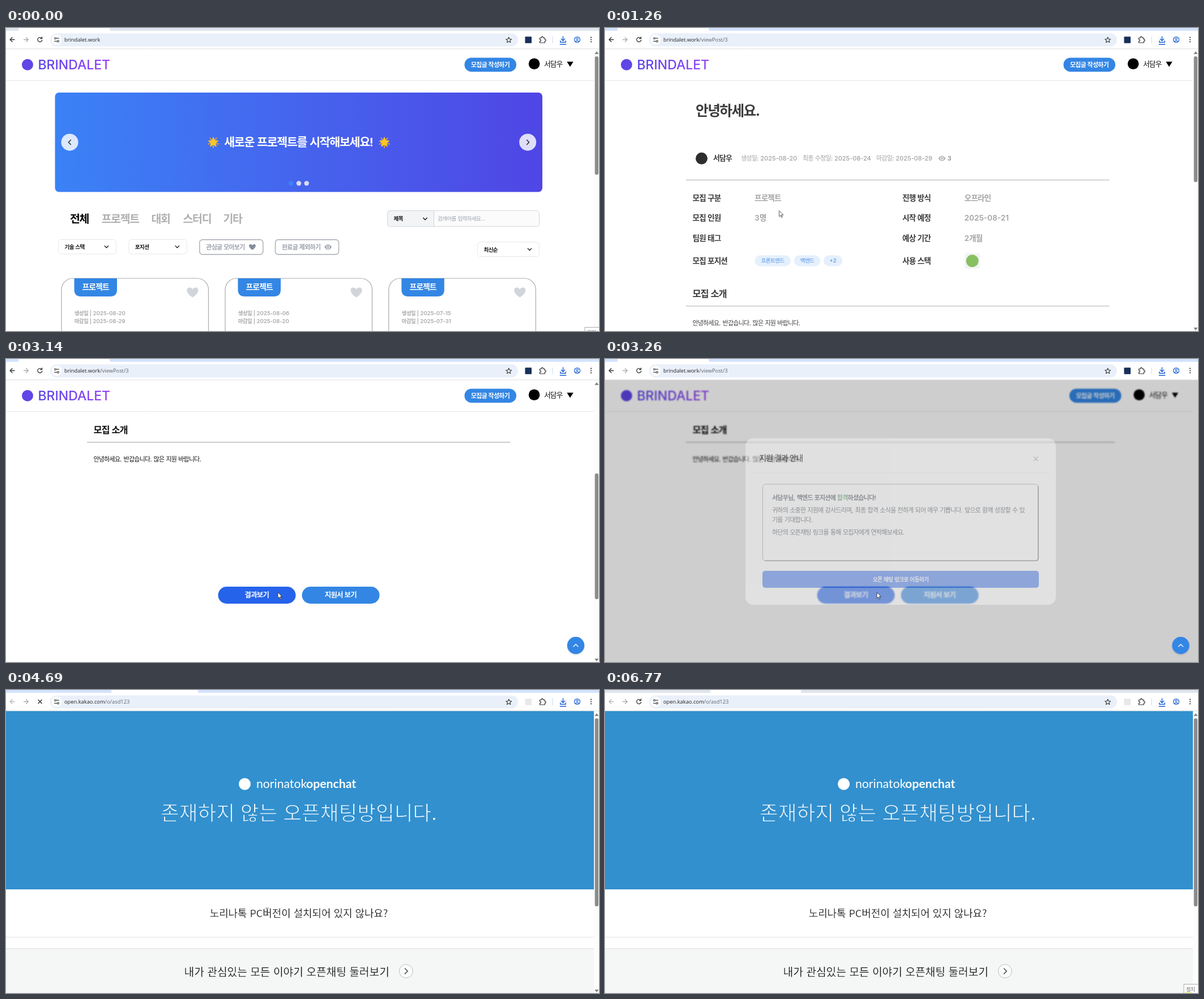
Animation of 1047 by 535 pixels, one loop 6810 ms. Source, as an HTML page:

```html
<!DOCTYPE html>
<html lang="ko">
<head>
<meta charset="utf-8">
<title>Project board demo</title>
<style>
html, body { margin: 0; width: 100%; height: 100%; overflow: hidden; background: #fff; }
svg { display: block; width: 1047px; height: 535px; }
text { font-family: Inter, "Noto Sans CJK KR", sans-serif; letter-spacing: -.064em; word-spacing: .065em; }
.l { letter-spacing: 0; }
.url { font-family: "Open Sans", "Noto Sans", sans-serif; letter-spacing: 0; }
.wide { font-family: "Noto Sans CJK KR", sans-serif; letter-spacing: 0; word-spacing: 0; }
.brand { font-family: Lato, sans-serif; letter-spacing: 0; }
.line { fill: none; stroke-linecap: round; stroke-linejoin: round; }

svg * { animation-duration: 6810ms; animation-iteration-count: infinite; animation-timing-function: linear; }
.home { animation-name: home; }
.post { animation-name: post; }
.mid { animation-name: mid; }
.site { animation-name: site; }
.chat { animation-name: chat; }
.loaded { animation-name: loaded; }
.loading { animation-name: loading; }
.ready { animation-name: ready; }
.home, .mid, .site, .chat, .loaded, .loading, .ready, .bar, .top { animation-timing-function: step-end; }
@keyframes home { 0% { opacity: 1 } 16.15%, 100% { opacity: 0 } }
@keyframes post { 0%, 16.14% { opacity: 0 } 16.15% { opacity: .3 } 18.5% { opacity: .82 } 20.26%, 100% { opacity: 1 } }
@keyframes mid { 0% { opacity: 0 } 16.15% { opacity: 1 } 66.96%, 100% { opacity: 0 } }
@keyframes site { 0% { opacity: 1 } 66.96%, 100% { opacity: 0 } }
@keyframes chat { 0% { opacity: 0 } 66.96%, 100% { opacity: 1 } }
@keyframes loaded { 0% { opacity: 0 } 67.8%, 100% { opacity: 1 } }
@keyframes loading { 0% { opacity: 0 } 66.96% { opacity: 1 } 72.25%, 100% { opacity: 0 } }
@keyframes ready { 0% { opacity: 1 } 66.96% { opacity: 0 } 72.25%, 100% { opacity: 1 } }

.homeScroll { animation-name: homeScroll; }
.homeThumb { animation-name: homeThumb; }
.postScroll { animation-name: postScroll; }
.postThumb { animation-name: postThumb; }
@keyframes homeScroll {
  0%, 10.7% { transform: translateY(0) } 11.75%, 12.33% { transform: translateY(-84px) }
  13.1% { transform: translateY(-200px) } 14.3%, 100% { transform: translateY(-277px) }
}
@keyframes homeThumb {
  0%, 10.7% { transform: translateY(0) } 11.75%, 12.33% { transform: translateY(35px) }
  13.1% { transform: translateY(83px) } 14.3%, 100% { transform: translateY(115px) }
}
@keyframes postScroll {
  0%, 21.2% { transform: translateY(0); animation-timing-function: ease-in-out }
  28.5%, 100% { transform: translateY(-344px) }
}
@keyframes postThumb {
  0%, 21.2% { transform: translateY(0); animation-timing-function: ease-in-out }
  28.5%, 100% { transform: translateY(152px) }
}
.top { animation-name: top; }
@keyframes top { 0% { opacity: 0 } 25%, 100% { opacity: 1 } }

.modal { animation-name: modal; }
.blur { animation-name: blur; }
.shift { animation-name: shift; animation-timing-function: step-end; }
.bar { animation-name: bar; }
.extra { animation-name: extra; animation-timing-function: step-end; }
@keyframes modal { 0%, 46.8% { opacity: 0 } 49.6%, 100% { opacity: 1 } }
@keyframes blur { 0%, 46.8% { filter: none } 46.81% { filter: blur(.1px) } 49.6%, 100% { filter: blur(2.6px) } }
@keyframes shift { 0% { transform: none } 46.8%, 100% { transform: translateX(10.5px) } }
@keyframes extra { 0% { opacity: 0 } 46.8%, 100% { opacity: 1 } }
@keyframes bar { 0% { opacity: 1 } 46.8% { opacity: 0 } 66.96%, 100% { opacity: 1 } }

.result { animation-name: result; }
.apply { animation-name: apply; }
@keyframes result {
  0%, 30.5% { fill: #3386e4 } 31.4%, 32.4% { fill: #2563eb } 33.6%, 39.4% { fill: #3386e4 } 40.5%, 100% { fill: #2563eb }
}
@keyframes apply { 0%, 32.8% { fill: #3386e4 } 33.77%, 38.2% { fill: #2563eb } 39.6%, 100% { fill: #3386e4 } }

.strip { animation-name: strip; animation-timing-function: step-end; }
.newTab { animation-name: newTab; }
.tip { animation-name: tip; animation-timing-function: step-end; }
@keyframes strip { 0% { fill: #dfe5ee } 15.57% { fill: #d3e3fd } 96.92%, 100% { fill: #dfe5ee } }
@keyframes newTab { 0%, 66.95% { width: 0 } 66.96% { width: 130px } 68.87% { width: 153px } 70.5%, 100% { width: 160px } }
@keyframes tip {
  0% { opacity: 1; transform: translateY(9px) } .59% { opacity: 0; transform: none }
  98.83%, 100% { opacity: 1; transform: none }
}

.cursor { animation-name: move; }
.arrow, .hand, .beam { animation-timing-function: step-end; }
.arrow { animation-name: arrow; }
.hand { animation-name: hand; }
.beam { animation-name: beam; }
@keyframes move {
  0%, .59% { transform: translate(1042px, 530px) }
  4.41% { transform: translate(710px, 440px) }
  7.64% { transform: translate(450px, 368px) }
  10.28%, 11.1% { transform: translate(353px, 348px) }
  11.75%, 12.33% { transform: translate(334px, 350px) }
  15%, 26.5% { transform: translate(307.5px, 322.5px) }
  31.4%, 32% { transform: translate(440px, 413px) }
  33.77%, 37% { transform: translate(590px, 412px) }
  40.53%, 53.16% { transform: translate(480px, 412px) }
  56.68%, 80% { transform: translate(461px, 385px) }
  84% { transform: translate(760px, 440px) }
  87.96%, 100% { transform: translate(1030px, 536px) }
}
@keyframes arrow {
  0% { opacity: 0 } .59% { opacity: 1 } 11.4% { opacity: 0 } 16.15% { opacity: 1 }
  54.92% { opacity: 0 } 80.62% { opacity: 1 } 87.96%, 100% { opacity: 0 }
}
@keyframes hand { 0% { opacity: 0 } 11.4% { opacity: 1 } 16.15% { opacity: 0 } 54.92% { opacity: 1 } 67.8%, 100% { opacity: 0 } }
@keyframes beam { 0% { opacity: 0 } 67.8% { opacity: 1 } 80.62%, 100% { opacity: 0 } }
</style>
</head>
<body>
<svg id="stage" viewBox="0 0 1047 535" xmlns="http://www.w3.org/2000/svg"></svg>
<script>
const BLUE = '#3386e4', SKY = '#3290ce', GREY = '#9ca3af', USER = '서담우';

const edge = (c, w = 1) => `stroke="${c}" stroke-width="${w}"`;
// Hangul is set slightly tight; other runs keep their natural spacing.
const text = (x, y, size, str, o = {}) =>
  `<text x="${x}" y="${y}" font-size="${size}" font-weight="${o.w || 400}" fill="${o.c || '#111'}" ` +
  `text-anchor="${o.a || 'start'}" class="${o.k || ''}" ${o.e || ''}>` +
  (o.k ? str : str.replace(/[^가-힣\s]+/g, '<tspan class="l">$&</tspan>')) + '</text>';
const box = (x, y, w, h, r, fill, rest = '') =>
  `<rect x="${x}" y="${y}" width="${w}" height="${h}" rx="${r}" fill="${fill}" ${rest}/>`;
const dot = (x, y, r, fill, rest = '') => `<circle cx="${x}" cy="${y}" r="${r}" fill="${fill}" ${rest}/>`;
const line = (d, c = '#111', w = 1.3) => `<path class="line" d="${d}" ${edge(c, w)}/>`;
const group = (k, ...parts) => `<g class="${k}">${parts.join('')}</g>`;
const down = (x, y) => line(`M${x - 3.3} ${y - 1.7}l3.3 3.4 3.3-3.4`);
const heart = (x, y, s, c) =>
  `<path transform="translate(${x} ${y}) scale(${s})" fill="${c}" d="M0 9C-14 0-11-8.5-5.5-8.5-2.5-8.5-.6-6.7 0-5 .6-6.7 2.5-8.5 5.5-8.5 11-8.5 14 0 0 9Z"/>`;
const eye = (x, y, c) =>
  `<path d="M${x - 6.5} ${y}q6.5-9 13 0-6.5 9-13 0Z" fill="${c}"/>` + dot(x, y, 2.9, '#fff') + dot(x, y, 1.7, c);

const star = (x, y) => {
  const at = (i, r) => {
    const a = i * Math.PI / 5 - Math.PI / 2;
    return `${(x + r * Math.cos(a)).toFixed(1)} ${(y + r * Math.sin(a)).toFixed(1)}`;
  };
  const pts = [...Array(10).keys()];
  return pts.filter(i => i % 2).map(i => line(`M${at(i, 6.5)}L${at(i, 9.3)}`, '#e9a13b', 2)).join('') +
    `<path d="M${pts.map(i => at(i, i % 2 ? 4.8 : 10)).join('L')}Z" fill="#fcc626"/>`;
};

const tags = (x, y, more, w, c) =>
  [[0, 63.5, '프론트엔드'], [69.5, 46.5, '백엔드'], ...(more ? [[121.5, 33.5, '+2']] : [])]
    .map(([dx, tw, s]) => box(x + dx, y - 9.7, tw, 19.4, 9.7, '#e0edfd') +
      text(x + dx + tw / 2, y + 3.4, 9.5, s, { w, c, a: 'middle' })).join('');

const select = (x, y, w, s) =>
  box(x, y, w, 25.5, 5, '#fff', edge('#e5e7eb')) + text(x + 11, y + 16.5, 9.55, s, { w: 600 }) + down(x + w - 17, y + 12.8);

const toggle = (x, s) => box(x, 373.8, 112, 26, 5, '#fff', edge('#a6abb3', 1.4)) +
  text(x + 11.5, 390.6, 10.95, s, { w: 600, c: GREY });

const card = (x, made, due, title, more) => group('',
  box(x, 442, 259.5, 293, 20, '#fff', edge('#aaa', 1.2)),
  `<path d="M${x + 22.5} 442h75.5v20q0 12-12 12h-51.5q-12 0-12-12Z" fill="${BLUE}"/>`,
  text(x + 60.2, 462.4, 13.8, '프로젝트', { w: 700, c: '#fff', a: 'middle' }),
  heart(x + 231.5, 466.8, 1, '#d1d5db'),
  text(x + 22.7, 506.8, 9.55, `생성일 | ${made}`, { w: 600, c: '#aaa' }),
  text(x + 22.7, 520.6, 9.55, `마감일 | ${due}`, { w: 600, c: '#aaa' }),
  text(x + 22.7, 559, 12.2, title, { w: 600, c: '#000' }),
  tags(x + 22.6, 605.8, more, 600, '#2b7de0'),
  dot(x + 33, 652, 11, '#6db33f'),
  dot(x + 33, 707, 9, '#000'), text(x + 49, 711, 10.95, USER, { w: 500 }), eye(x + 220, 707, '#aaa'));

const round = (x, d) => dot(x, 201.7, 15, '#fff', 'opacity=".82"') + line(d, '#222', 1.4);

const home = group('homeScroll',
  box(86.5, 114, 860.5, 175.5, 7, 'url(#banner)'),
  round(112.5, 'M114.3 197.7l-4 4 4 4'), round(921.2, 'M919.6 197.7l4 4-4 4'),
  star(366, 202), star(668, 202),
  text(517, 209.3, 20.6, '새로운 프로젝트를 시작해보세요!', { w: 700, c: '#fff', a: 'middle' }),
  dot(503.3, 274.3, 4.2, '#3b82f6'), dot(517, 274.3, 4.2, '#d9dcf5'), dot(530.7, 274.3, 4.2, '#d9dcf5'),
  [[113, '전체'], [168.5, '프로젝트'], [256.5, '대회'], [312.5, '스터디'], [383.5, '기타']]
    .map(([x, s], i) => text(x, 343.6, 19.4, s, { w: 700, c: i ? '#b0b0b0' : '#000' })).join(''),
  box(673.5, 322.5, 268, 28, 5, '#fbfbfc', edge('#d1d5db')),
  `<path d="M755.5 322.5v28h-77q-5 0-5-5v-18q0-5 5-5Z" fill="#f3f4f6" ${edge('#d1d5db')}/>`,
  text(684.5, 340.3, 9.55, '제목', { w: 600 }), down(740, 337),
  text(762, 340.3, 9.55, '검색어를 입력하세요...', { c: GREY }),
  select(92.5, 373.5, 102, '기술 스택'), select(216.8, 373.5, 102.5, '포지션'), select(832.5, 378, 109, '최신순'),
  toggle(341.8, '관심글 모아보기'), heart(435, 386.8, .58, '#858d99'),
  toggle(475.5, '완료글 제외하기'), eye(568.6, 386.8, GREY),
  card(98, '2025-08-20', '2025-08-29', '안녕하세요.', true),
  card(387, '2025-08-06', '2025-08-20', 'abc'),
  card(675.8, '2025-07-15', '2025-07-31', 'test'));

const fact = (x, y, label, value) =>
  text(x, y, 13.6, label, { w: 700 }) + text(x + 109.5, y, 13.6, value, { w: 600, c: '#909090' });
const meta = (x, s) => text(x, 234.2, 10.95, s, { w: 500, c: '#8c8c8c' });
const rule = y => line(`M143.5 ${y}H890`, '#999', 1) + group('extra', line(`M890 ${y}h10`, '#999', 1));
const pill = (k, x, s) => `<rect class="${k}" x="${x}" y="746" width="137" height="30" rx="15"/>` +
  text(x + 68.3, 765.2, 12.4, s, { w: 700, c: '#fff', a: 'middle' });

const post = group('postScroll',
  text(160, 154.5, 24.7, '안녕하세요.', { w: 700 }),
  dot(170.5, 230.3, 10.5, '#000'), text(191, 234.4, 12.9, USER, { w: 600 }),
  meta(240, '생성일: 2025-08-20'), meta(349, '최종 수정일: 2025-08-24'), meta(479, '마감일: 2025-08-29'),
  eye(595, 230.3, '#a5a5a5'), text(604.5, 234.2, 10.95, '3', { w: 600, c: '#777' }),
  rule(268.3),
  fact(154.5, 304.6, '모집 구분', '프로젝트'), fact(525, 304.6, '진행 방식', '오프라인'),
  fact(154.5, 340.3, '모집 인원', '3명'), fact(525, 340.3, '시작 예정', '2025-08-21'),
  fact(154.5, 376, '팀원 태그', ''), fact(525, 376, '예상 기간', '2개월'),
  fact(154.5, 415.7, '모집 포지션', ''), fact(525, 415.7, '사용 스택', ''),
  tags(264.3, 411, true, 500, '#2b78dc'),
  box(634.8, 397.5, 27.5, 27.5, 5, '#f1f1f1'), dot(648.5, 411.2, 11, '#6db33f'),
  text(154.5, 474.6, 16.4, '모집 소개', { w: 700 }), rule(491),
  text(154.5, 524.8, 10.95, '안녕하세요. 반갑습니다. 많은 지원 바랍니다.'),
  pill('result', 374.5, '결과보기'), pill('apply', 522.5, '지원서 보기'));

const header = box(0, 37, 1047, 55.5, 0, '#fff') + line('M0 92.5H1038', '#e5e7eb', 1) +
  dot(38, 64.7, 10, '#5f46e6') +
  text(56.5, 73.2, 23, 'BRINDALET', { w: 500, c: 'url(#ink)' }) +
  group('shift',
    box(809.5, 52.5, 91.5, 24.7, 12.3, BLUE),
    text(855, 69, 10.95, '모집글 작성하기', { w: 700, c: '#fff', a: 'middle' }),
    dot(932.6, 63.3, 9.8, '#000'), text(950, 67.6, 12.7, USER, { w: 500 }),
    '<path d="M990.3 59.5h11.4l-5.7 9Z"/>');

const thumb = (k, h) => `<rect class="${k}" x="1039.7" y="50" width="6.3" height="${h}" rx="3.1" fill="#8b8b8b"/>`;
const bar = (...thumbs) => box(1038, 37, 9, 498, 0, '#fcfcfc') +
  '<path d="M1039.3 46l3.6-5 3.6 5ZM1039.3 529l3.6 5 3.6-5Z" fill="#858585"/>' + thumbs.join('');

const body = (y, s, w) => text(295, y, 10.95, s, { w, c: '#1f2937' });
const modal = box(248, 140, 548, 294, 14, '#fff') +
  text(272.5, 180.4, 13.7, '지원 결과 안내', { w: 700 }) +
  line('M757 172.6l7.2 7.2m0-7.2l-7.2 7.2', '#888', 1.2) + line('M258.5 201H784', '#e5e7eb', 1) +
  box(278.5, 221, 486.5, 135.5, 5, '#fff', edge('#8d8d8d')) +
  line('M764.8 225V351.5q0 4.8-4.8 4.8H283', '#5c5c5c', 1.6) +
  body(249.2, `${USER}님, 백엔드 포지션에 합격하셨습니다!`, 600).replace('합격', '<tspan fill="#22803f">합격</tspan>') +
  body(271.3, '귀하의 소중한 지원에 감사드리며, 최종 합격 소식을 전하게 되어 매우 기쁩니다. 앞으로 함께 성장할 수 있') +
  body(288, '기를 기대합니다.') + body(309.6, '하단의 오픈채팅 링크를 통해 모집자에게 연락해보세요.') +
  box(278, 374, 488, 30, 5, '#2563eb') +
  text(522, 392.5, 9.7, '오픈 채팅 링크로 이동하기', { w: 600, c: '#fff', a: 'middle' });

// A thin edge in the background colour gives the lighter weight of these lines.
const wide = (y, size, s, c, bg, w) => text(517, y, size, s, { k: 'wide', c, a: 'middle', e: edge(bg, w) });
const chat = box(0, 37, 1038, 315, 0, SKY) + dot(421.5, 166, 10.5, '#fff') +
  text(442, 173, 21.2, 'norinatok', { k: 'brand', c: '#fff' }) +
  text(530, 173, 21.2, 'openchat', { k: 'brand', w: 700, c: '#fff' }) +
  wide(229.5, 35.6, '존재하지 않는 오픈채팅방입니다.', '#fff', SKY, 1.1) +
  wide(401, 17.9, '노리나톡 PC버전이 설치되어 있지 않나요?', '#111', '#fff', .25) +
  line('M0 436.5H1038', '#e2e2e2', 1) + box(0, 456.5, 1038, 79, 0, '#f5f7f7') + line('M0 456.5H1038', '#dedede', 1) +
  group('', `<g transform="translate(-21.3)">${wide(504.6, 19.2, '내가 관심있는 모든 이야기 오픈채팅 둘러보기', '#111', '#f5f7f7', .25)}</g>`) +
  dot(706.3, 496.4, 12, '#fafbfb', edge('#bcbcbc')) + line('M704.5 491.7l4.6 4.7-4.6 4.7', '#555', 1.6);

const url = (k, host, path) => group(k, text(103, 24.3, 9.3, host + `<tspan fill="#5f6368">${path}</tspan>`, { k: 'url', c: '#202124' }));
const back = 'M15 20.5H7.5m3.5-3.8l-3.8 3.8 3.8 3.8';
const toolbar = box(0, 0, 1047, 37, 0, '#fff') +
  '<rect class="strip" width="1047" height="5"/>' +
  group('site', '<path d="M20 5q2.5 0 2.5-3V0H183v2q0 3 3 3Z" fill="#fff"/>') +
  '<rect class="newTab" x="186" y="0" width="0" height="5.5" fill="#fff"/>' +
  line('M0 36.8H1047', '#dcdfe3', 1) +
  line(back, '#b5b8bc') + group('site', line(back, '#3c4043')) +
  line('M31.5 20.5H39m-3.5-3.8l3.8 3.8-3.8 3.8', '#a9acb0') +
  group('ready', line('M63 18a4 4 0 1 0 .8 3.5M63.6 15.8v2.9h-2.9', '#333')) +
  group('loading', line('M57 17.5l6.2 6.2m0-6.2l-6.2 6.2', '#333', 1.4)) +
  box(78, 9.5, 826, 23, 11.5, '#e9f0fa') + dot(89.5, 20.8, 9, '#fff') +
  line('M89.5 18.2h4M85.5 23.4h4', '#444', 1.2) + dot(87, 18.2, 1.5, 'none', edge('#444', 1.1)) + dot(92, 23.4, 1.5, 'none', edge('#444', 1.1)) +
  url('home', 'brindalet.work', '') + url('mid', 'brindalet.work', '/viewPost/3') + url('chat', 'open.kakao.com', '/o/asd123') +
  line('M887.7 16.3l1.4 3.2 3.5.3-2.7 2.3.9 3.4-3.1-1.9-3.1 1.9.9-3.4-2.7-2.3 3.5-.3Z', '#333', 1.1) +
  box(916.5, 15.3, 11.5, 11.5, 1, '#e8e8e8') + group('site', box(916.5, 15.3, 11.5, 11.5, 1, '#18305a')) +
  line('M942.5 17.5h2.8q0-2.3 1.6-2.3t1.6 2.3h2.8v2.7q2 0 2 1.6t-2 1.6v2.6h-8.8v-2.7q2 0 2-1.6t-2-1.6Z', '#333', 1.2) +
  line('M965 15.5v11', '#c4d7f4', 1) +
  line('M983.5 15v7.5m-3.2-3.2l3.2 3.2 3.2-3.2M978.8 22.8v2.4h9.4v-2.4M978.3 28.8h10.4', '#1a5fd6', 1.4) +
  dot(1008.5, 20.5, 5, 'none', edge('#1a5fd6', 1.2)) + dot(1008.5, 19, 1.7, 'none', edge('#1a5fd6', 1.1)) +
  line('M1005.3 23.9q3.2-2.6 6.4 0', '#1a5fd6', 1.1) +
  [16.7, 20.5, 24.3].map(y => dot(1033, y, 1.1, '#333')).join('');

const tip = box(1022, 519.5, 27, 18, 0, '#fff', edge('#aaa')) +
  text(1026, 531.8, 9, '정지', { c: '#666' }) + box(1024, 533, 12, 2, 0, '#f6f29a');

const cursor = group('cursor',
  group('arrow', `<path d="M0 0V10.5L2.5 8.2 4.1 12 5.7 11.3 4.1 7.6H7.4Z" fill="#fff" ${edge('#222', .8)}/>`),
  group('hand', `<path d="M-1.2 1.2q1.2-2.2 2.4 0v4l3.6.9q1.4.4 1.2 2.2l-.9 4.4H-.3L-3.5 8.2q-.2-1.5 1.2-1.2l1.1 1Z" fill="#fff" ${edge('#222', .8)}/>`),
  group('beam', line('M-2.5 0h2l.5.6.5-.6h2M0 .6v11M-2.5 12.2h2l.5-.6.5.6h2', '#444', .8)));

document.getElementById('stage').innerHTML = `
<defs>
  <linearGradient id="banner"><stop stop-color="#3b82f6"/><stop offset="1" stop-color="#4f46e5"/></linearGradient>
  <linearGradient id="ink"><stop stop-color="#5546e6"/><stop offset="1" stop-color="#9a45f8"/></linearGradient>
</defs>` +
  box(0, 0, 1047, 535, 0, '#fff') +
  group('blur', group('home', home), group('post', post), header) +
  group('bar', group('home', bar(thumb('homeThumb', 209))), group('mid', bar(thumb('postThumb', 222)))) +
  group('modal', box(0, 37, 1047, 498, 0, '#000', 'opacity=".5"')) +
  group('top', group('shift',
    dot(1006, 507.5, 16, '#000', 'opacity=".08"'), dot(1006, 505.7, 15.2, BLUE), line('M1002 507.7l4-4 4 4', '#fff', 1.3))) +
  group('modal', modal) +
  group('chat', box(0, 37, 1047, 498, 0, '#fff'), group('loaded', chat, bar(thumb('', 332)))) +
  toolbar + group('tip', tip) + cursor;
</script>
</body>
</html>
```
